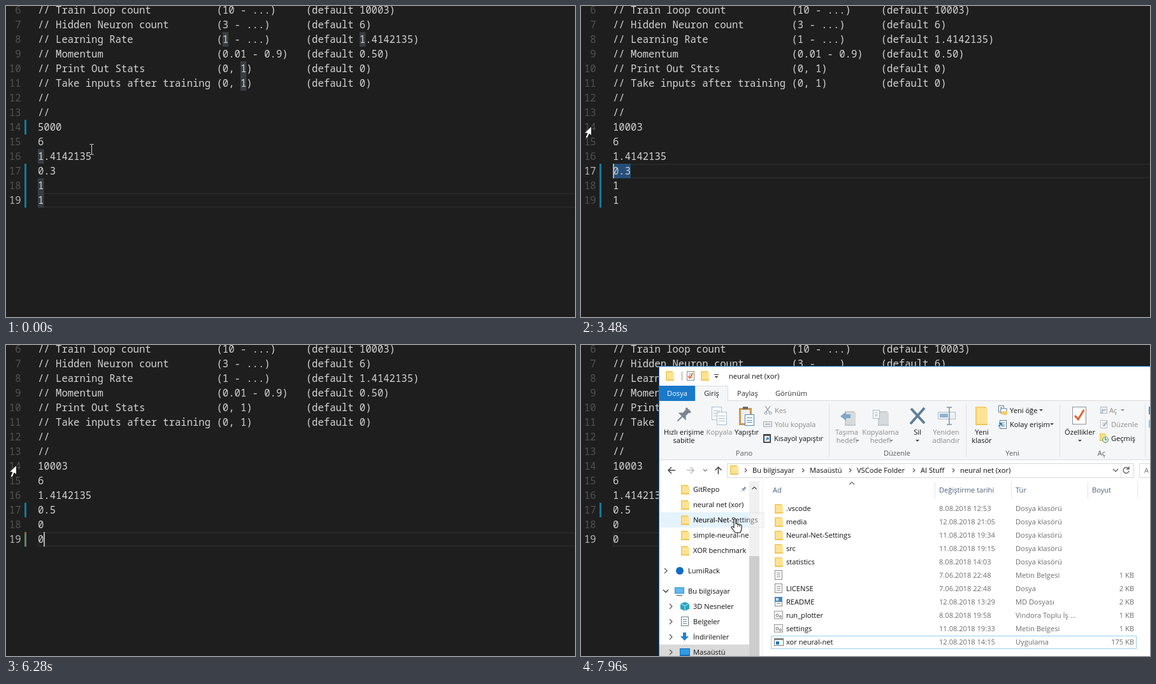
Write an HTML page that moves like this. It is 893 by 489 pixels and loops after 8000 ms.

```html
<!DOCTYPE html>
<html lang="tr">
<head>
<meta charset="utf-8">
<style>
html, body { margin: 0; width: 100%; height: 100%; overflow: hidden; background: #1e1e1e; }
svg { display: block; }
#editor { font: 15.583px "Noto Sans Mono", "DejaVu Sans Mono", monospace; }
#win { font: 11.1px "Open Sans", "Noto Sans", sans-serif; }
</style>
</head>
<body>
<svg width="893" height="489" viewBox="0 0 893 489">
  <g id="editor"></g>
  <g id="win"></g>
  <g id="mouse"></g>
</svg>
<script>
const $ = id => document.getElementById(id);
const R = (x, y, w, h, fill, more = '') =>
  `<rect x="${x}" y="${y}" width="${w}" height="${h}" fill="${fill}" ${more}/>`;
const T = (x, y, s, fill = '#111', anchor = 'start') =>
  `<text x="${x}" y="${y}" fill="${fill}" text-anchor="${anchor}">${s}</text>`;
const P = (d, stroke, width = 1, fill = 'none') =>
  `<path d="${d}" stroke="${stroke}" stroke-width="${width}" fill="${fill}"/>`;

// ---------- editor ----------
const CW = 9.35, LH = 23, X0 = 50;
const lineY = n => -5 + (n - 6) * LH;
const colX = c => X0 + c * CW;
const at = (steps, t) => steps.filter(s => s[0] <= t).pop();
const within = (t, a, b) => t >= a && t < b;

const notes = [
  ['Train loop count', '(10 - ...)', '(default 10003)'],
  ['Hidden Neuron count', '(3 - ...)', '(default 6)'],
  ['Learning Rate', '(1 - ...)', '(default 1.4142135)'],
  ['Momentum', '(0.01 - 0.9)', '(default 0.50)'],
  ['Print Out Stats', '(0, 1)', '(default 0)'],
  ['Take inputs after training', '(0, 1)', '(default 0)'],
  [''], ['']
];
const values = {
  14: [[0, '5000'], [1000, ''], [1120, '1'], [1240, '10'], [1360, '100'], [1680, '1000'], [2000, '10003']],
  15: [[0, '6']],
  16: [[0, '1.4142135']],
  17: [[0, '0.3'], [3560, '0'], [3760, '0.'], [3960, '0.5']],
  18: [[0, '1'], [5120, ''], [5280, '0']],
  19: [[0, '1'], [6120, ''], [6280, '0']]
};
const caretLine = [[0, 19], [320, 14], [2640, 15], [2800, 16], [3000, 17], [4640, 18], [5480, 19]];
const markEnd = { 14: 2320, 17: 9e9, 18: 5640, 19: 6280 };
const noteText = notes.map((row, i) => {
  const y = lineY(6 + i) + 17;
  return row.map((s, k) => T(colX([0, 30, 45][k]), y, k ? s : '// ' + s, '#d4d4d4')).join('');
}).join('');

function editor(t, mouseX) {
  const text = n => at(values[n], t)[1];
  const line = at(caretLine, t)[1];
  let caret = line == 16 ? 5 : text(line).length, selection = '';
  const select = (n, from) => {
    const x = colX(from);
    selection = R(x, lineY(n), colX(text(n).length) - x, LH, '#264f78');
    caret = from;
  };
  if (within(t, 320, 1000)) select(14, Math.max(0, Math.min(4, Math.round((mouseX - X0) / CW))));
  if (within(t, 3320, 3560)) select(17, 0);

  let out = R(X0 + 1, lineY(line) + 1, 860, LH - 2, 'none', 'stroke="#282828" stroke-width="2"') + selection;
  if (t < 320 || within(t, 4920, 5120) || within(t, 5960, 6120)) {
    const spots = [[8, 31], [8, 54], [10, 34], [11, 34], [16, 0]];
    for (const n of [18, 19]) if (text(n) == '1') spots.push([n, 0]);
    out += spots.map(([n, c]) => R(colX(c), lineY(n), CW, LH, '#393d41')).join('');
  }
  for (const n in markEnd) if (t < markEnd[n]) out += R(29, lineY(n), 3, LH, '#0c7d9d');
  if (within(t, 6280, 6480)) out += R(29, 294, 3, LH, '#5a8568') + R(29, 294, 3, 3, '#94632f');
  for (let n = 6; n < 20; n++)
    out += T(23.7, lineY(n) + 17, n, n == line ? '#b8b8b8' : '#525252', 'end');
  out += noteText;
  for (const n in values) out += T(X0, lineY(n) + 17, text(n), '#d4d4d4');
  if (within(t, 320, 6720)) out += R(Math.floor(colX(caret)), lineY(line), 2, LH, '#aeafad');
  return out;
}

// ---------- file window ----------
const GRAY = '#8b8b8b', STEEL = '#5f7d99', BLUE = '#1979ca';
const folder = (x, y, w = 13, h = 15, [edge, face, base] = ['#f3cd65', '#ffe394', '#f0c654']) =>
  R(x, y, w - 2, h, edge) + R(x + 2, y + 2, w - 2, h - 2, face) + R(x, y + h - 2, w, 2, base);
const sheet = (x, y, w = 11, h = 14, line = '#8a8a8a') =>
  R(x + .5, y + .5, w, h, '#fff', `stroke="${line}"`) +
  [.3, .5, .7].map(k => R(x + 3, y + Math.round(h * k), w - 5, 1, line)).join('');
const chevron = (x, y, dir, c = '#555', s = 3) => P({
  right: `M${x - s / 2} ${y - s}l${s} ${s}l${-s} ${s}`,
  down: `M${x - s} ${y - s / 2}l${s} ${s}l${s} ${-s}`,
  up: `M${x - s} ${y + s / 2}l${s} ${-s}l${s} ${s}`
}[dir], c, 1.2);
const drop = (x, y, c = '#444') => P(`M${x - 3} ${y - 1}h6l-3 3z`, 'none', 0, c);
const check = (x, y, s) => P(`M${x} ${y}l${s * .35} ${s * .4}l${s * .6} ${-s}`, '#e8602c', s / 5);
const pin = (x, y, k, c) =>
  `<g transform="translate(${x} ${y}) rotate(45) scale(${k})">${P('M-3 -7h6v2h-1v4l3 3h-10l3-3v-4h-1z', 'none', 0, c)}${R(-.6, 2, 1.2, 6, c)}</g>`;
const monitor = (x, y) => R(x, y, 15, 10, '#2f8fd0') + R(x + 1, y + 1, 13, 8, '#5fb9ee') + R(x + 3, y + 12, 9, 1.5, '#6d7b88');
const big = (x, a, b, c) => T(x, 141, a, c, 'middle') + T(x, 154, b, c, 'middle');

const side = ['GitRepo', 'neural net (xor)', 'Neural-Net-Settings', 'simple-neural-net', 'XOR benchmark'];
const files = [
  ['.vscode', '8.08.2018 12:53'],
  ['media', '12.08.2018 21:05'],
  ['Neural-Net-Settings', '11.08.2018 19:34'],
  ['src', '11.08.2018 19:15'],
  ['statistics', '8.08.2018 14:03'],
  ['', '7.06.2018 22:48', 'Metin Belgesi', '1 KB'],
  ['LICENSE', '7.06.2018 22:48', 'Dosya', '2 KB'],
  ['README', '12.08.2018 13:29', 'MD Dosyası', '2 KB'],
  ['run_plotter', '8.08.2018 19:58', 'Vindora Toplu İş ...', '1 KB'],
  ['settings', '11.08.2018 19:33', 'Metin Belgesi', '1 KB'],
  ['xor neural-net', '12.08.2018 14:15', 'Uygulama', '175 KB']
];

function titleAndTabs() {
  return R(122.5, 33.5, 780, 460, '#fff', `stroke="${BLUE}"`) +
    folder(133, 41) + R(158, 42, 1, 14, '#999') + sheet(166, 41) + check(168, 49, 8) +
    folder(188, 41) + R(209, 46, 7, 1, '#333') + drop(212.5, 50) + T(232, 53, 'neural net (xor)') +
    R(123, 64, 56, 24, BLUE) + T(151, 80, 'Dosya', '#fff', 'middle') +
    R(123, 88, 770, 92, '#f5f6f7') + R(230, 87, 663, 1, '#dadbdc') +
    P('M179.5 88V64.5H230.5V88', '#dadbdc', 1, '#f5f6f7') +
    T(205, 80, 'Giriş', '#222', 'middle') + T(245, 80, 'Paylaş', '#333') + T(305, 80, 'Görünüm', '#333') +
    R(123, 180, 770, 1, '#dadbdc');
}

function ribbon() {
  const seps = [389, 604, 751, 885].map(x => R(x, 92, 1, 84, '#dfe0e1')).join('');
  const groups = [[256, 'Pano'], [496, 'Düzenle'], [677, 'Yeni'], [817, 'Aç']]
    .map(([x, s]) => T(x, 174, s, '#5a5a5a', 'middle')).join('');
  const grayFolder = x => folder(x, 104, 17, 23, ['#c9ced3', '#d6dadd', '#c2c8cd']);
  return seps + groups +
    pin(161, 110, 1.7, '#79848e') + big(161.5, 'Hızlı erişime', 'sabitle') +
    sheet(205, 97, 15, 20, '#a9bccd') + sheet(213, 105, 15, 20, '#a9bccd') + big(217, 'Kopyala', '', GRAY) +
    R(248, 99, 20, 27, '#c69a55') + R(251, 102, 14, 21, '#eee') + R(254, 97, 8, 4, '#6b6b6b') +
    sheet(257, 109, 14, 17, '#4d87b8') + big(260, 'Yapıştır', '') +
    P('M289 96l7 10M297 96l-7 10', '#8d9aa6', 1.3) +
    P('M288 107a2 2 0 1 0 4 0a2 2 0 1 0-4 0M295 107a2 2 0 1 0 4 0a2 2 0 1 0-4 0', '#8d9aa6') +
    T(304, 107, 'Kes', GRAY) +
    R(286.5, 120.5, 13, 8, '#e5e8eb', 'stroke="#a5b0ba"') + R(289, 124, 8, 1, '#909ba5') + T(304, 129, 'Yolu kopyala', GRAY) +
    R(286, 140, 12, 14, '#4a4a4a') + R(288, 143, 8, 9, '#fff') + P('M290 150l4-4m-3 0h3v3', BLUE, 1.4) +
    T(303, 151, 'Kısayol yapıştır') +
    grayFolder(414) + P('M423 109h-7v-4l-9 7l9 7v-4h7z', 'none', 0, '#7fa6c6') +
    big(417, 'Taşıma', 'hedefi', GRAY) + drop(434, 150, GRAY) +
    grayFolder(466) + sheet(458, 102, 10, 13, '#9fb5c8') +
    big(470, 'Kopyalama', 'hedefi', GRAY) + drop(487, 150, GRAY) +
    P('M518 100l21 23M539 99l-22 25', STEEL, 4) + T(528, 141, 'Sil', '#111', 'middle') + drop(528, 150) +
    R(560.5, 105.5, 27, 11, '#eef2f5', 'stroke="#a9bccd"') + R(563, 108, 13, 6, '#91b3d0') +
    P('M574 98h4m4 0h-4v27m-4 0h8', '#7b94aa', 1.5) + big(573, 'Yeniden', 'adlandır', GRAY) +
    folder(619, 97, 19, 29) + big(629, 'Yeni', 'klasör') +
    sheet(655, 95, 8, 10, STEEL) + R(659, 100, 9, 7, '#fff', `stroke="${STEEL}"`) + R(661, 104, 8, 6, '#f3cd65') +
    T(673, 107, 'Yeni öğe') + drop(722, 102) +
    sheet(657, 118, 10, 13, STEEL) + P('M655 128l5-5m-4 0h4v4', BLUE, 1.5) + T(673, 129, 'Kolay erişim') + drop(739, 124) +
    R(771.5, 97.5, 21, 27, '#fff', 'stroke="#8a949c"') + check(775, 111, 15) +
    T(783, 141, 'Özellikler', '#111', 'middle') + drop(783, 150) +
    R(815.5, 97.5, 10, 10, '#f1f3f5', 'stroke="#a9b6c2"') + P('M818 107v-5h6', '#8fa9bf', 1.5) + T(829, 107, 'Aç', GRAY) + drop(850, 102, GRAY) +
    sheet(815, 118, 10, 12, '#b5bec6') + P('M820 128l6-8', '#9fb0bf', 2) + T(832, 129, 'Düzenle', GRAY) +
    folder(814, 139, 11, 12) + '<circle cx="823" cy="149" r="4.5" fill="#d9f0dc" stroke="#4b9560"/>' + P('M823 146v3h2', '#356') +
    T(832, 151, 'Geçmiş') + R(891, 97, 2, 12, '#3d9bd8') + R(891, 118, 2, 12, '#8fc4e8');
}

function addressBar() {
  const path = [[269, 'Bu bilgisayar'], [359, 'Masaüstü'], [433, 'VSCode Folder'], [533, 'AI Stuff'], [595, 'neural net (xor)']];
  return P('M148 197H137m5-5l-5 5l5 5', '#444', 1.5) + P('M166 197h11m-5-5l5 5l-5 5', '#bbb', 1.5) +
    chevron(195, 197, 'down', '#777') + P('M215.5 203V192m-5 5l5-5l5 5', '#444', 1.5) +
    R(229.5, 186.5, 638, 22, '#fff', 'stroke="#d9d9d9"') + R(847, 187, 1, 21, '#e2e2e2') + folder(234, 189) +
    path.map(([x, s]) => chevron(x - 10.5, 197, 'right') + T(x, 201, s)).join('') +
    chevron(839, 197, 'down', '#555', 4) + P('M859 194a4.5 4.5 0 1 0 1 4m0-7v4h-4', '#555', 1.3) +
    R(876.5, 186.5, 30, 22, '#fff', 'stroke="#d9d9d9"') + T(884, 201, 'A', '#777');
}

function sidebar() {
  const tree = [
    [387, 168, 'Bu bilgisayar', monitor(147, 381)],
    [411, 176, '3D Nesneler', P('M163 404l7 3v8l-7 3l-7-3v-8z', 'none', 0, '#28a3c4') + P('M156 407l7 3l7-3M163 410v8', '#bdeaf4')],
    [435, 176, 'Belgeler', sheet(157, 427, 11, 14, '#6d7f90')],
    [459, 176, 'İndirilenler', P('M160 452h5v6h4l-6.5 7l-6.5-7h4z', 'none', 0, '#2382d2')],
    [483, 176, 'Masaüstü', R(155, 477, 16, 12, '#176fb5') + R(156, 478, 14, 9, '#2f9be6')]
  ];
  return R(123, 215, 141, 24, '#e5f3ff', 'id="hover"') + R(123, 471, 141, 18, '#d9d9d9') +
    side.map((s, i) => folder(157, 220 + i * 24) + T(176, 231 + i * 24, s)).join('') +
    pin(255, 227, .65, '#8b98a4') +
    '<circle cx="155" cy="355" r="6" fill="#0f6cc4"/>' + T(168, 359, 'LumiRack') +
    tree.map(([y, x, s, icon]) => icon + T(x, y + 4, s)).join('') +
    R(264, 214, 16, 275, '#f0f0f0') + R(264, 332, 16, 157, '#cdcdcd') + R(280, 214, 18, 275, '#fff') +
    R(284, 214, 1, 275, '#f0f0f0') + chevron(272, 225, 'up', '#444', 3.5) +
    '<g id="arrows">' + chevron(133, 355, 'right', '#555', 4) + chevron(133, 387, 'down', '#222', 4) +
    [411, 435, 459, 483].map(y => chevron(141, y, 'right', '#555', 4)).join('') + '</g>' +
    '<g id="tip" opacity=".7">' + R(264, 264, 23, 23, '#f4f4f4', 'stroke="#ddd"') +
    R(238, 264, 26, 22, '#e5f3ff') + T(176, 279, side[2], '#333') + '</g>';
}

function fileList() {
  const heads = [[301, 'Ad'], [562, 'Değiştirme tarihi'], [682, 'Tür'], [802, 'Boyut']];
  const rows = files.map(([name, date, kind = 'Dosya klasörü', size = ''], i) => {
    const y = 257 + i * 21;
    let icon = i < 5 ? folder(304, y - 7) : sheet(304, y - 8);
    if (name == 'README') icon += R(304, y - 8, 12, 8, '#4a86bd') + R(306, y - 6, 4, 4, '#cfe4f5');
    if (name == 'run_plotter' || name == 'settings')
      icon = R(303.5, y - 6.5, 13, 12, '#f6f6f6', 'stroke="#999"') +
        `<circle cx="308" cy="${y}" r="2" fill="none" stroke="#777"/><circle cx="313" cy="${y + 2}" r="1.5" fill="none" stroke="#777"/>`;
    if (kind == 'Uygulama')
      icon = R(303.5, y - 5.5, 14, 11, '#fff', 'stroke="#777"') + R(304, y - 5, 13, 2, '#888') + R(306, y - 1, 5, 5, BLUE);
    return icon + T(322, y + 4, name) + T(562, y + 4, date, '#6d6d6d') +
      T(682, y + 4, kind, '#6d6d6d') + T(868, y + 4, size, '#6d6d6d', 'end');
  }).join('');
  return heads.map(([x, s]) => T(x, 232, s, '#4c607a')).join('') +
    [555, 675, 795, 873].map(x => R(x, 215, 1, 26, '#e5e5e5')).join('') +
    chevron(425, 217.5, 'up', '#666', 4) +
    R(298.5, 457.5, 573, 20, '#fff', 'stroke="#99cfe8"') + rows;
}

$('win').innerHTML = titleAndTabs() + ribbon() + addressBar() + sidebar() + fileList();

// ---------- pointer ----------
const OPEN = 7640;
const route = [[0, 134, 225], [80, 134, 225], [320, 100, 191], [680, 16, 189], [7000, 16, 189],
  [7560, 187, 229], [7760, 187, 229], [7960, 239, 273], [8000, 239, 273]];

function mouseAt(t) {
  const i = route.findIndex(p => p[0] > t);
  const [a, b] = [route[i - 1], route[i]];
  const k = (t - a[0]) / (b[0] - a[0]), e = k * k * (3 - 2 * k);
  return [a[1] + (b[1] - a[1]) * e, a[2] + (b[2] - a[2]) * e].map(Math.round);
}

function pointer(x, y, t) {
  if (t >= OPEN)
    return P(`M${x + 1} ${y + 1}q2-2 3 0v7q2-1 3 1q2-1 3 1q3-1 3 2v5l-2 5h-8l-6-8q0-3 4 0z`, '#111', 1.1, '#fff') +
      P(`M${x + 7} ${y + 9}v4m3-3v3`, '#111', .8);
  if (x < 46)
    return P(`M${x + .5} ${y}v15l-3.5-3l-3 7l-3-1.3l3-6.7h-5z`, '#111', 1, '#fff');
  return P(`M${x - 2.5} ${y - 7.5}h2.5l.5 .5l.5-.5h2.5M${x + .5} ${y - 7}v15M${x - 2.5} ${y + 8.5}h2.5l.5-.5l.5 .5h2.5`, '#d8d8d8');
}

// ---------- loop ----------
let shown = '';
function draw() {
  const t = Math.floor(performance.now() % 8000 / 40) * 40;
  const [x, y] = mouseAt(t);
  const picture = editor(t, x);
  if (picture != shown) $('editor').innerHTML = shown = picture;
  $('mouse').innerHTML = pointer(x, y, t);

  const row = Math.max(0, Math.round((y - 227) / 24));
  $('win').style.display = t >= OPEN ? '' : 'none';
  $('hover').setAttribute('y', 215 + row * 24);
  $('tip').style.display = row == 2 ? '' : 'none';
  $('arrows').setAttribute('opacity', Math.min(1, .12 + Math.max(0, t - 7680) / 240));
  requestAnimationFrame(draw);
}
draw();
</script>
</body>
</html>
```
